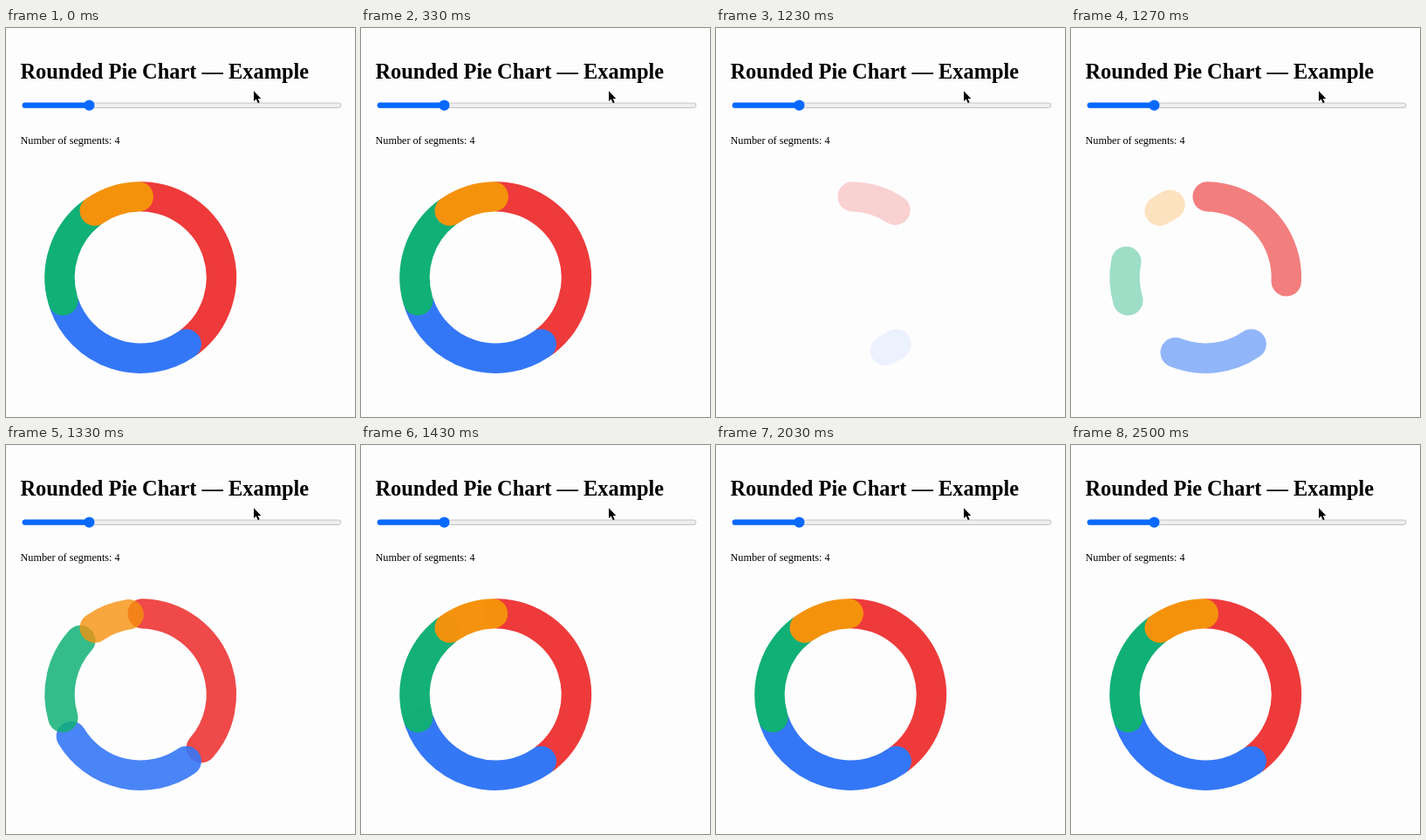
An HTML page that plays this animation: 400x446 px, repeating every 3060 ms.

```html
<!DOCTYPE html>
<html lang="en">
<head>
<meta charset="utf-8">
<title>Rounded Pie Chart</title>
<style>
  html, body { margin: 0; width: 100%; height: 100%; overflow: hidden; background: #fefdfe; }
  svg { display: block; width: 400px; height: 446px; }
  text { font-family: "Liberation Serif", "Times New Roman", Times, serif; fill: #000; }
  h1, .title { font-size: 24.4px; font-weight: bold; }
  .label { font-size: 12.2px; }
  #ring path { fill: none; stroke-width: 34.4; stroke-linecap: round; }
</style>
</head>
<body>
<svg viewBox="0 0 400 446">
  <text class="title" x="16.5" y="58">Rounded Pie Chart — Example</text>
  <rect x="19" y="86" width="365" height="5.4" rx="2.7" fill="#efeff0" stroke="#b4b4b6" stroke-width=".8"/>
  <rect x="18.6" y="85.6" width="77" height="6.2" rx="3.1" fill="#0769ff"/>
  <circle cx="95.4" cy="88.6" r="6.1" fill="#0769ff"/>
  <text class="label" x="16.5" y="133">Number of segments: 4</text>
  <g id="ring"></g>
  <path d="M284 72.3V84l2.7-2.5 2.1 4.7 1.9-.9-2-4.4h3.6z" fill="#000" stroke="#fff" stroke-width=".8" paint-order="stroke"/>
</svg>
<script>
const LOOP = 3060, CLEAR = 1100, START = 1202.5, STAGGER = 12.5, STIFFNESS = 0.0327;
const CX = 154.2, CY = 286, RADIUS = 92.7, GAP = 1.5;
const segments = [
  { share: 0.4, color: '#ee3a3a' },
  { share: 0.3, color: '#3477f6' },
  { share: 0.2, color: '#11b076' },
  { share: 0.1, color: '#f5920c' }
];

// Degrees run clockwise from the top.
function point(deg) {
  const a = deg * Math.PI / 180;
  return `${CX + RADIUS * Math.sin(a)} ${CY - RADIUS * Math.cos(a)}`;
}

const ring = document.getElementById('ring');
let angle = 0;
const arcs = segments.map(({ share, color }) => {
  const path = document.createElementNS('http://www.w3.org/2000/svg', 'path');
  const end = angle + share * 360;
  path.setAttribute('d', `M${point(angle + GAP)}A${RADIUS} ${RADIUS} 0 0 1 ${point(end - GAP)}`);
  path.setAttribute('pathLength', 1);
  path.setAttribute('stroke', color);
  ring.append(path);
  angle = end;
  return path;
});

// Critically damped spring from 0 to 1.
function spring(ms) {
  const x = Math.max(0, ms) * STIFFNESS;
  return 1 - (1 + x) * Math.exp(-x);
}

// Holds each picture for a 30 fps step, rounded to 10 ms.
function stepTime(ms) {
  const step = Math.floor((Math.floor(ms / 10) + 0.5) * 0.3);
  return 10 * Math.round(step * 10 / 3);
}

function draw(ms) {
  const t = stepTime(ms);
  arcs.forEach((path, i) => {
    const p = t < CLEAR ? 1 : spring(t - START - i * STAGGER);
    const done = p > 0.998;
    path.setAttribute('stroke-dasharray', done ? 'none' : `${p} 2`);
    path.setAttribute('opacity', done ? 1 : p);
  });
}

const origin = performance.now();
function tick() {
  draw((performance.now() - origin) % LOOP);
  requestAnimationFrame(tick);
}
tick();
</script>
</body>
</html>
```
